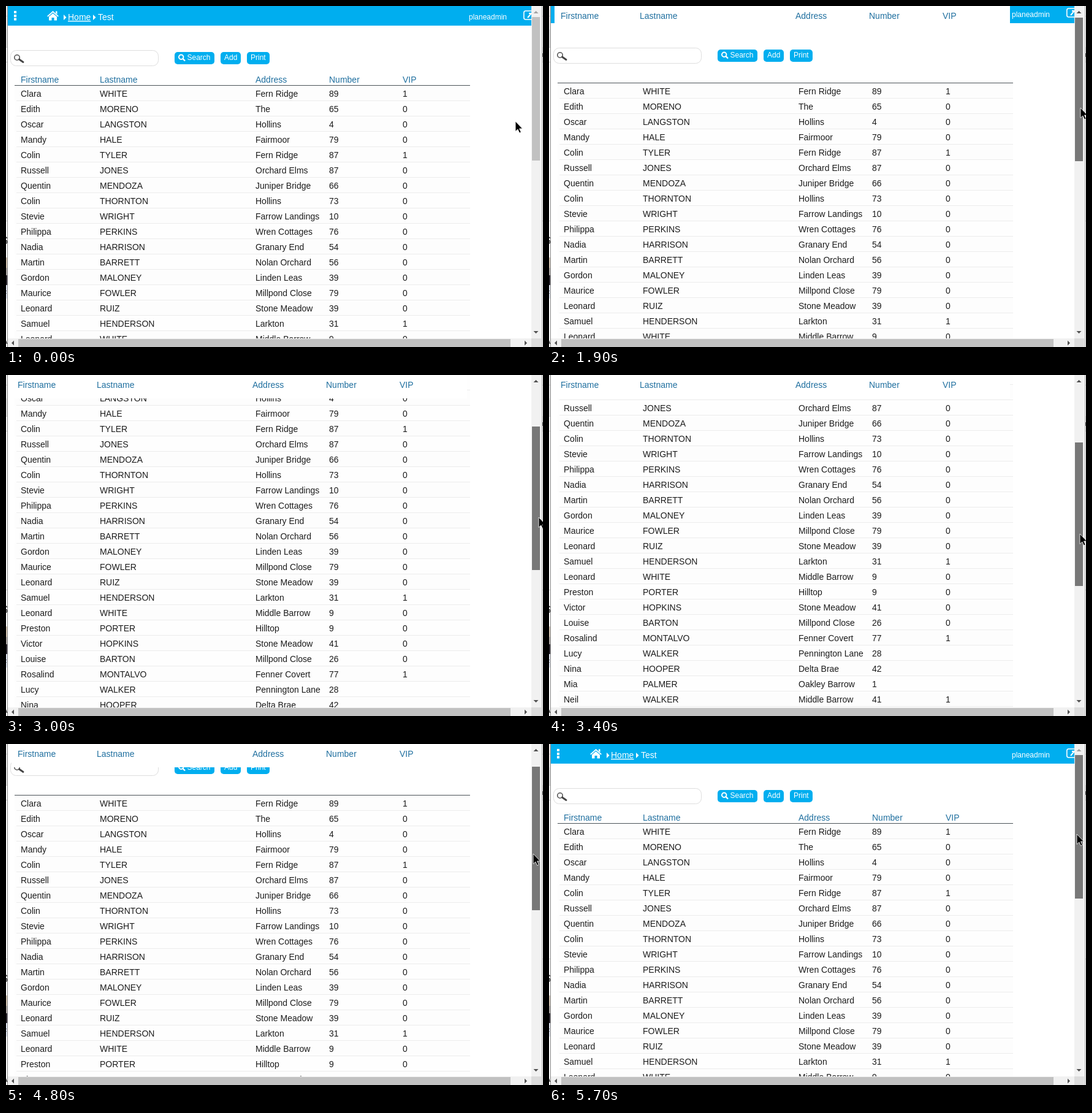
An HTML page for the animation above (5900 ms loop, 876 px wide and 556 px high).

```html
<!DOCTYPE html>
<html lang="en">
<head>
<meta charset="utf-8">
<title>Scrolling table</title>
<style>
html, body { margin: 0; width: 100%; height: 100%; overflow: hidden; background: #fff; }
svg { display: block; width: 876px; height: 556px; font: 14px "Liberation Sans", Arial, sans-serif; fill: #1c1c1c; }
.small { font-size: 12px; fill: #fff; }
.head { fill: #1f6f9f; }
.bar { fill: #00aeef; }
.white { fill: #fff; }
.arrow { fill: #505050; }
</style>
</head>
<body>
<svg viewBox="0 0 876 556">
  <defs>
    <clipPath id="view"><rect x="3" width="854" height="542"/></clipPath>
    <clipPath id="edge"><rect width="3" height="556"/></clipPath>
  </defs>

  <!-- slivers of the page behind the window -->
  <g clip-path="url(#edge)">
    <rect width="3" height="556" fill="#f7f7f7"/>
    <rect width="3" height="38" fill="#e9e9e9"/>
    <path d="M0 16.5H3M0 67.5H3M0 91.5H3M0 350.5H3" stroke="#cfcfcf"/>
    <rect y="38" width="3" height="29" fill="#dedede"/>
    <text x="-8" y="388" font-size="17">S</text>
    <rect y="410" width="3" height="17" fill="#cdbfae"/>
    <rect y="427" width="3" height="12" fill="#a8a3a0"/>
    <rect y="439" width="3" height="16" fill="#2c2730"/>
    <rect y="455" width="3" height="22" fill="#d9dfea"/>
    <text x="-6" y="473" font-size="12">F</text>
    <text x="-3" y="508">,</text>
    <text x="-7" y="551">A</text>
  </g>
  <path d="M2.5 0V556" stroke="#8c8c8c"/>
  <rect x="872" width="4" height="556" fill="#f3f3f3"/>
  <rect x="874" y="67" width="2" height="25" fill="#e2e2e2"/>
  <path d="M874 16.5H876M874 91.5H876M874 350.5H876" stroke="#cfcfcf"/>
  <path d="M875.5 77V83" stroke="#555"/>
  <path d="M874.5 0V556" stroke="#a9a9a9"/>

  <g clip-path="url(#view)">
    <rect x="3" width="854" height="542" class="white"/>
    <g id="page">
      <rect x="3" width="854" height="32" class="bar"/>
      <path class="white" d="M13 8h4v4h-4zM13 14h4v4h-4zM13 19.500h4v4h-4z"/>
      <path class="white" d="M76.500 8L86 16.500L84.500 17.500L76.500 10.500L68.500 17.500L67 16.500ZM81 8.500h2.500v5l-2.500-2zM76.500 12L83 17.500V23.500H78.500V19H74.500V23.500H70V17.500Z"/>
      <path class="white" d="M94 14l4.500 4.500l-4.500 4.500zM142 14l4.500 4.500l-4.500 4.500z"/>
      <text x="101" y="23" class="white" text-decoration="underline">Home</text>
      <text x="150" y="23" class="white">Test</text>
      <text x="755" y="22" class="small">planeadmin</text>
      <rect x="844.800" y="8" width="18" height="14" rx="3" fill="none" stroke="#fff" stroke-width="1.600"/>
      <path d="M851 19L857 12M853 12h5" fill="none" stroke="#fff" stroke-width="2"/>

      <rect x="7.500" y="72.500" width="241" height="25" rx="9" fill="#fff" stroke="#dedede"/>
      <circle cx="18" cy="84" r="4.200" fill="none" stroke="#555" stroke-width="1.600"/>
      <path d="M21.500 87L28 91.500" stroke="#444" stroke-width="2.800" stroke-linecap="round"/>
      <g class="bar">
        <rect x="275" y="75" width="65" height="20" rx="5"/>
        <rect x="350" y="75" width="33" height="20" rx="5"/>
        <rect x="393" y="75" width="37" height="20" rx="5"/>
      </g>
      <circle cx="285.700" cy="83.200" r="3.700" fill="none" stroke="#fff" stroke-width="2"/>
      <path d="M288.500 86L292 89.500" stroke="#fff" stroke-width="2.400"/>
      <text x="295.500" y="88" class="small">Search</text>
      <text x="356" y="88" class="small">Add</text>
      <text x="399" y="88" class="small">Print</text>

      <g id="rows"></g>
      <path d="M14 129.500H757" stroke="#4b5358"/>
    </g>
    <rect id="cover" x="9" width="743" height="38" class="white"/>
    <g id="head" class="head"></g>
  </g>

  <!-- scroll bars -->
  <rect x="857" width="15" height="542" fill="#f1f1f1"/>
  <rect x="3" y="542" width="854" height="14" fill="#f1f1f1"/>
  <rect x="857" y="542" width="16" height="14" fill="#dcdcdc"/>
  <rect x="20" y="543" width="803" height="13" fill="#c1c1c1"/>
  <path id="up" d="M860.500 12h8l-4-4z"/>
  <path class="arrow" d="M860.500 530h8l-4 4zM13 545.500v8l-4-4zM846 545.500v8l4-4z"/>
  <rect id="thumb" x="858" width="13" height="234"/>
  <path id="cursor" d="M0 0V16.500L3.800 13L6.600 19L9.200 17.800L6.500 12H11.500Z" fill="#000" stroke="#fff" stroke-width=".8"/>
</svg>
<script>
const people = `Clara,WHITE,Fern Ridge,89,1
Edith,MORENO,The,65,0
Oscar,LANGSTON,Hollins,4,0
Mandy,HALE,Fairmoor,79,0
Colin,TYLER,Fern Ridge,87,1
Russell,JONES,Orchard Elms,87,0
Quentin,MENDOZA,Juniper Bridge,66,0
Colin,THORNTON,Hollins,73,0
Stevie,WRIGHT,Farrow Landings,10,0
Philippa,PERKINS,Wren Cottages,76,0
Nadia,HARRISON,Granary End,54,0
Martin,BARRETT,Nolan Orchard,56,0
Gordon,MALONEY,Linden Leas,39,0
Maurice,FOWLER,Millpond Close,79,0
Leonard,RUIZ,Stone Meadow,39,0
Samuel,HENDERSON,Larkton,31,1
Leonard,WHITE,Middle Barrow,9,0
Preston,PORTER,Hilltop,9,0
Victor,HOPKINS,Stone Meadow,41,0
Louise,BARTON,Millpond Close,26,0
Rosalind,MONTALVO,Fenner Covert,77,1
Lucy,WALKER,Pennington Lane,28,
Nina,HOOPER,Delta Brae,42,
Mia,PALMER,Oakley Barrow,1,
Neil,WALKER,Middle Barrow,41,1`.split('\n');

// time, pointer x, pointer y, scroll offset
const keys = [
  [0, 831, 188, 0], [600, 857, 162, 0], [800, 858, 159, 0], [1100, 858, 159, 0],
  [1700, 866, 163, 0], [1900, 867, 166, 4], [2600, 872, 204, 96], [3400, 866, 259, 214],
  [3500, 866, 262, 221], [4200, 861, 208, 105], [4800, 860, 179, 46],
  [5300, 860, 157, 0], [5700, 861, 147, 0], [5900, 861, 147, 0]
];
const columns = [24, 153, 407, 527, 647];
const $ = id => document.getElementById(id);
const cells = (line, y) => line.split(',')
  .map((s, i) => `<text x="${columns[i]}" y="${y}">${s}</text>`).join('');

$('rows').innerHTML = people.map((line, i) => {
  const y = 130 + i * 25;
  const shade = i % 2 ? '#fefefe' : '#fdfdfd';
  return `<rect x="14" y="${y}" width="743" height="25" fill="${shade}"/>` +
    `<path d="M17 ${y + 24.5}H757" stroke="#ececec"/>` + cells(line, y + 18);
}).join('');
$('head').innerHTML = cells('Firstname,Lastname,Address,Number,VIP', 0);

function state(t) {
  const n = keys.findIndex(k => k[0] > t);
  const a = keys[n - 1], b = keys[n];
  const p = (t - a[0]) / (b[0] - a[0]);
  return a.map((v, i) => Math.round(v + (b[i] - v) * p));
}

const move = (id, x, y) => $(id).setAttribute('transform', `translate(${x} ${y})`);

function draw(now) {
  const t = Math.min(Math.floor(now % 5900 / 100) * 100, 5700);
  const [, x, y, scroll] = state(t);
  const stuck = scroll > 0;
  move('page', 0, -scroll);
  move('head', stuck ? -5 : 0, stuck ? 21 : 125);
  $('cover').setAttribute('visibility', stuck ? 'visible' : 'hidden');
  $('up').setAttribute('fill', stuck ? '#505050' : '#a3a3a3');
  $('thumb').setAttribute('y', 18 + Math.floor(scroll * .43));
  $('thumb').setAttribute('fill', t < 500 ? '#c1c1c1' : t < 1200 ? '#a8a8a8' : '#787878');
  move('cursor', x, y);
  requestAnimationFrame(draw);
}
draw(0);
</script>
</body>
</html>
```
